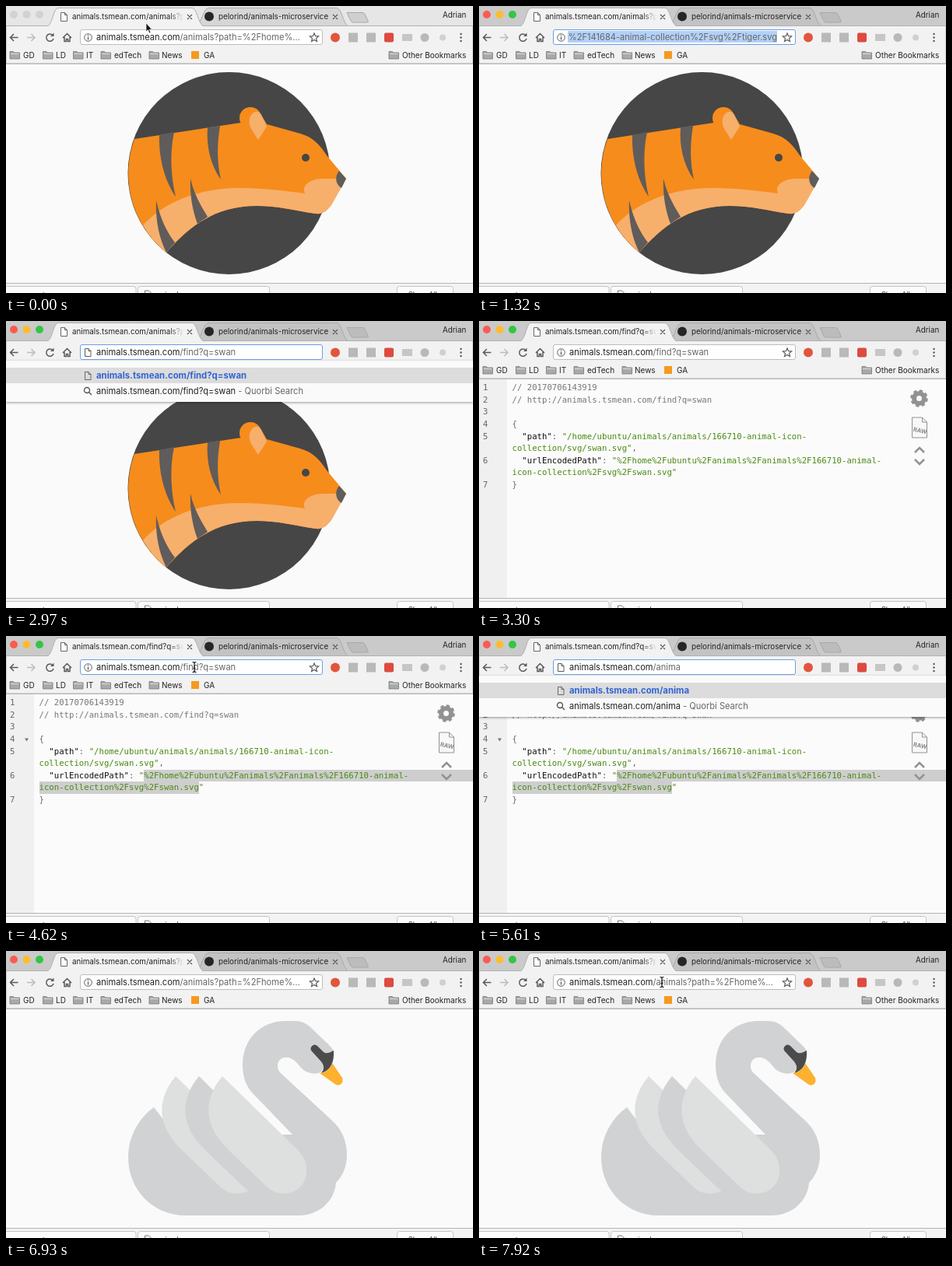
Animation, 600 px wide and 369 px high, one loop 8 s. Source, as an HTML page:

```html
<!DOCTYPE html>
<html lang="en">
<head>
<meta charset="utf-8">
<title>Animal lookup in a browser</title>
<style>
html, body { margin: 0; width: 100%; height: 100%; overflow: hidden; background: #fafafa; }
body { position: relative; font-family: Inter, Roboto, sans-serif; color: #222; }
svg { position: absolute; left: 0; top: 0; width: 600px; height: 369px; }
div, pre { position: absolute; margin: 0; white-space: pre; }
[hidden] { display: none !important; }
#json { left: 0; top: 0; width: 600px; height: 356px; background: #fbfbfb; }
pre { top: 78.2px; font: 10.67px/15.6px "DejaVu Sans Mono", monospace; color: #666; }
pre i { font-style: normal; color: #777; }
pre b { font-weight: 400; color: #111; }
pre s { text-decoration: none; color: #4b8a14; }
.gutter { left: 0; top: 74px; width: 36px; height: 282px; background: #f0f0f0; }
#marks { left: 0; top: 0; }
.mark { background: #cecece; height: 15.6px; }
#title { left: 85px; top: 6px; width: 143px; font-size: 9.8px; line-height: 15px; overflow: hidden;
  -webkit-mask: linear-gradient(90deg, #000 125px, transparent); mask: linear-gradient(90deg, #000 125px, transparent); }
#box { left: 95px; top: 30px; width: 312px; height: 20px; box-sizing: border-box; background: #fff;
  border: 1px solid #bdbdbd; border-radius: 3px; }
#box.focus { border: 1.5px solid #6a9ee6; }
#url { left: 116px; top: 32px; width: 267px; font-size: 11.1px; line-height: 16px; color: #666;
  overflow: hidden; text-overflow: ellipsis; }
#url.typing { width: 291px; text-overflow: clip; }
#url.end { left: 114px; width: 269px; display: flex; justify-content: flex-end; text-overflow: clip; }
#url b { font-weight: 400; color: #222; }
#url u { display: inline-block; text-decoration: none; background: #b3d1f8; height: 15px; line-height: 16px; }
#list { left: 0; top: 51px; width: 600px; padding: 8.5px 0 3.5px; background: #fafafa;
  box-shadow: 0 1px 3px #0006; }
.row { position: relative; height: 20.5px; line-height: 21px; font-size: 11.1px; }
.row:first-child { background: #dcdcdc; }
.row p { margin: 0 2px 0 116px; overflow: hidden; text-overflow: ellipsis; }
.row .page { color: #3264d2; font-size: 11.35px; }
.row .page b { font-weight: 700; }
.row i { font-style: normal; color: #666; }
.row svg { left: 99px; top: 4px; width: 12px; height: 13px; }
</style>
</head>
<body>
<svg id="tiger">
  <circle cx="286.5" cy="215" r="130" fill="#464646"/>
  <g fill="#f68c1c">
    <circle cx="314" cy="144" r="14"/>
    <path d="M165 171L302 150 320 132 328 140 335 152 378 164C396 169 404 180 412 192L437 222 419 254C413 264 406 268 398 267C370 263 350 257 322 257C270 257 236 282 206 317A130 130 0 0 1 165 171Z"/>
  </g>
  <g fill="#f7af6c">
    <path d="M176 282C205 250 250 234 300 234C335 234 360 238 384 241C379 230 392 222 408 222H437L419 254C413 264 406 268 398 267C370 263 350 257 322 257C270 257 236 282 206 317A130 130 0 0 1 176 282Z"/>
    <path d="M314 142C318 134 325 134 328 140L335 155 324 172 315 158C312 152 312 146 314 142Z"/>
  </g>
  <g fill="#5f5c5b">
    <path d="M428 212L437 222 431 234C423 229 422 219 428 212Z"/>
    <path d="M197 166L216 162C210 190 212 220 218 245C204 225 196 195 197 166Z"/>
    <path d="M259 156L275 154C271 178 271 200 276 223C263 205 257 180 259 156Z"/>
    <path d="M237 222C241 240 249 255 259 271L246 280C239 262 236 240 237 222Z"/>
    <path d="M193 250C198 272 206 290 217 304L206 317C195 295 192 270 193 250Z"/>
  </g>
  <circle cx="385" cy="195" r="5" fill="#464646"/>
</svg>

<svg id="swan">
  <defs><path id="feather" d="M278 161C265 176 258 195 261 213C264 232 275 245 288 258L334 302C342 310 350 312 358 312C376 311 388 297 386 278C385 268 380 261 375 256Z"/></defs>
  <path fill="#d0d2d3" d="M368 236L317 183C309 175 304 162 304 147C304 112 328 91 357 90H372C378 90 384 92 389 96L412 118C417 123 421 126 421 131L407 152C405 158 396 159 388 156C380 153 378 148 372 142C362 133 349 136 349 148C349 153 351 155 354 158L419 218C432 230 438 245 438 262C438 278 432 290 424 298C422 322 402 340 376 340H230C190 340 157 308 157 265C157 240 170 215 190 201L204 219 290 260 357 236Z"/>
  <use href="#feather" x="-60" fill="#dedfdf"/>
  <use href="#feather" x="-30" fill="#d0d2d3"/>
  <use href="#feather" fill="#dedfdf"/>
  <path fill="#4b4b4c" d="M392.500 128.500A5 5 0 0 1 400 122L408 130C412 133 417 130 421 128C422 143 417 154 405 157C409 152 410 147 403 140Z"/>
  <path fill="#fdb12f" d="M403 157C412 156 417 151 419 144L432 163C434 169 430 174 424 172Z"/>
</svg>

<div id="json">
  <div class="gutter"></div>
  <div id="marks"><div class="mark" style="left:177px;top:171.800px;width:423px"></div><div class="mark" style="left:43px;top:187.400px;width:205px"></div></div>
  <pre style="left:5px">1
2
3
4
5

6

7</pre>
  <pre style="left:42.500px"><i>// 20170706143919
// http://animals.tsmean.com/find?q=swan</i>

{
  <b>"path"</b>: <s>"/home/ubuntu/animals/animals/166710-animal-icon-
collection/svg/swan.svg"</s>,
  <b>"urlEncodedPath"</b>: <s>"%2Fhome%2Fubuntu%2Fanimals%2Fanimals%2F166710-animal-
icon-collection%2Fsvg%2Fswan.svg"</s>
}</pre>
  <svg fill="none" stroke="#929292">
    <path id="fold" d="M24 131.500h5l-2.500 4z" fill="#777" stroke="none"/>
    <circle cx="565.500" cy="99.500" r="6.500" stroke-width="6"/>
    <circle cx="565.500" cy="99.500" r="9.800" stroke-width="3" stroke-dasharray="4.200 3.497"/>
    <path d="M556.500 124h13l6 6v20h-19zM569.500 124v6h6" fill="#f8f8f8"/>
    <text x="558" y="143.500" font-size="7.500" font-weight="700" fill="#888" stroke="none" transform="rotate(12 566 140)">RAW</text>
    <path d="M560 169l6-6 6 6M560 178l6 6 6-6" stroke-width="2.500"/>
  </svg>
</div>

<svg id="chrome">
  <rect id="strip" width="600" height="26"/>
  <g id="lights"><circle cx="10" cy="11" r="5"/><circle cx="26.500" cy="11" r="5"/><circle cx="43" cy="11" r="5"/></g>
  <path id="backTab" d="M245 25.500C251 22 254 2.500 260 2.500H425C431 2.500 433 22 439 25.500" stroke="#a8a8a8"/>
  <path id="newTab" d="M438 8.500H458Q460 8.500 461 10.500L465 19Q466 21 464 21H446Q444 21 443 19Z" stroke="#a8a8a8"/>
  <path d="M0 25.500H54C60 22 61 2.500 67 2.500H239C245 2.500 247 22 253 25.500H600V74H0Z" fill="#f2f2f2" stroke="#b0b0b0"/>
  <path d="M0 74.500H600" stroke="#b8b8b8"/>
  <path d="M70.500 8.500h5l3 3v8h-8zM75.500 8.500v3h3" fill="#fff" stroke="#666"/>
  <circle cx="261" cy="13.500" r="6" fill="#262626"/>
  <g stroke="#555" stroke-width="1.100"><path d="M233 11l6 6m0-6l-6 6M420 11l6 6m0-6l-6 6"/></g>
  <g font-size="9.800" fill="#222">
    <text x="273" y="17">pelorind/animals-microservice</text>
    <text x="561" y="15">Adrian</text>
  </g>
  <g fill="none" stroke="#5a5a5a" stroke-width="1.500">
    <path d="M15.500 40.500H5.500m4.500-4.500l-4.500 4.500 4.500 4.500"/>
    <path d="M27 40.500h10m-4.500-4.500l4.500 4.500-4.500 4.500" stroke="#bcbcbc"/>
    <path d="M60 37.500A4.700 4.700 0 1 0 61 42"/><path d="M61.500 34.500v4.500h-4.500z" fill="#5a5a5a" stroke="none"/>
    <path d="M73 41l5.500-5.500L84 41M75 40v5.500h2.500v-3h2v3H82V40"/>
  </g>
  <circle cx="423" cy="40.500" r="6" fill="#e2553d"/>
  <g fill="#b9b9b9">
    <rect x="440" y="34.500" width="12" height="12"/><rect x="463" y="34.500" width="12" height="12"/>
    <rect x="509" y="36" width="13" height="9" fill="#c6c6c6"/><circle cx="538" cy="40.500" r="5.500"/>
    <circle cx="561" cy="40.500" r="4" fill="#d0d0d0"/>
  </g>
  <rect x="486" y="34.500" width="12" height="12" rx="2" fill="#dd4a40"/>
  <g fill="#555"><circle cx="584.500" cy="36" r="1.200"/><circle cx="584.500" cy="40.500" r="1.200"/><circle cx="584.500" cy="45" r="1.200"/></g>
  <g id="bookmarks" font-size="10" fill="#222"><rect x="238" y="58" width="10" height="10" fill="#f59a1f"/></g>
  <rect y="356" width="600" height="13" fill="#f3f3f3"/>
  <path d="M0 356.500H600" stroke="#b4b4b4"/>
  <g fill="#fbfbfb" stroke="#c4c4c4"><rect x="-4" y="360.500" width="171" height="24" rx="3"/><rect x="169.500" y="360.500" width="169" height="24" rx="3"/><rect x="502.500" y="360.500" width="72" height="24" rx="3"/></g>
  <g font-size="9" fill="#444"><text x="24" y="374">report.svg</text><text x="194" y="374">animals.svg</text><text x="517" y="374">Show All</text></g>
  <path d="M178.500 370v-4h5l3 3v3" fill="none" stroke="#777"/>
</svg>
<div id="title"></div>
<div id="list"></div>
<div id="box"></div>
<svg fill="none" stroke="#5a5a5a">
  <g id="info"><circle cx="105.500" cy="40.500" r="4.800"/><path d="M105.500 39.500v4M105.500 37v1.300" stroke-width="1.300"/></g>
  <path id="doc" d="M101.500 35.500h4.500l3 3v7h-7.500zM106 35.500v3h3"/>
  <path id="star" stroke-width="1.200" d="M396 35l1.600 3.700 4 .3-3.100 2.600 1 3.900-3.500-2.100-3.500 2.100 1-3.900-3.100-2.600 4-.3z"/>
</svg>
<div id="url"></div>
<svg>
  <path id="arrow" d="M0 0V11L2.500 8.700 4.200 13 6 12.200 4.200 8.200H7.500Z" fill="#111" stroke="#fff" stroke-width=".7"/>
  <path id="beam" d="M-2.500-6.500Q0-6.500 0-5Q0-6.500 2.500-6.500M0-5V5M-2.500 6.500Q0 6.500 0 5Q0 6.500 2.500 6.500M-1.500 1.500h3" fill="none" stroke="#111" stroke-width="1.200"/>
</svg>

<script>
const $ = id => document.getElementById(id);
const STEP = 330, LOOP = 8000;
const HOST = 'animals.tsmean.com';
const HOME = '/animals?path=%2Fhome%2Fubuntu%2Fanimals%2Fanimals%2F';
const TIGER = HOME + '141684-animal-collection%2Fsvg%2Ftiger.svg';
const SWAN = HOME + '166710-animal-icon-collection%2Fsvg%2Fswan.svg';

const folder = x => `<path d="M${x} 58.500h4.500l1.500 1.500h6.500v8h-12.500z" fill="#a9a9a9" stroke="#777" stroke-width=".8"/><path d="M${x + 1} 61.500h10.500" stroke="#ddd"/>`;
const label = (x, name) => `<text x="${x}" y="66.700">${name}</text>`;
$('bookmarks').innerHTML += [[5, 22, 'GD'], [47.5, 64, 'LD'], [86.5, 103, 'IT'], [122, 139, 'edTech'], [184, 200, 'News'], [492, 509, 'Other Bookmarks']]
  .map(([x, tx, name]) => folder(x) + label(tx, name)).join('') + label(254, 'GA');

const pageIcon = '<svg fill="none" stroke="#666"><path d="M2.500 1.500h4.500l3 3v7h-7.500zM7 1.500v3h3"/></svg>';
const lensIcon = '<svg fill="none" stroke="#555" stroke-width="1.400"><path d="M7.500 7.500L11 11"/><circle cx="5" cy="5" r="3.500"/></svg>';
const pageRow = (typed, rest = '') => `<div class="row">${pageIcon}<p class="page"><b>${HOST + typed}</b>${rest}</p></div>`;
const searchRow = typed => `<div class="row">${lensIcon}<p>${HOST + typed}<i> - Quorbi Search</i></p></div>`;

// Typing in the address field: typed text, selected completion, extra suggestions.
const typing = (typed, rest = '', more = '') => ({
  path: typed, selected: rest, mode: 'typing', focus: true, cursor: null,
  rows: pageRow(typed, rest) + searchRow(typed) + more
});
const loaded = (page, path) => ({ page, path, title: path, selected: '', mode: '', focus: false, rows: '', cursor: null });
const pointer = (kind, x, y) => ({ cursor: { kind, x, y } });

// Changes applied one after another, keyed by step.
const changes = {
  0: { ...loaded('tiger', TIGER), active: false, ...pointer('arrow', 180, 22) },
  1: { active: true, ...pointer('beam', 182, 40) },
  2: { mode: 'all', focus: true },
  3: { mode: 'end', ...pointer('beam', 388, 41) },
  4: { cursor: null },
  5: typing('/', 'find?q=tiger', pageRow('/', 'find?q=swan') + pageRow('/', TIGER.slice(1)) + pageRow('/', 'animals')),
  6: typing('/find', '?q=tiger'),
  7: typing('/find?q=', 'tiger'),
  8: typing('/find?q=s', 'wan'),
  9: typing('/find?q=swan'),
  10: loaded('json', '/find?q=swan'),
  11: { fold: true, ...pointer('beam', 177, 177) },
  12: { marks: true, ...pointer('beam', 249, 196) },
  13: pointer('beam', 256, 222),
  14: { focus: true, ...pointer('beam', 242, 40) },
  15: typing('/', 'find?q=swan'),
  16: typing('/an'),
  17: typing('/anima'),
  18: typing('/animals?'),
  19: typing('/animals?path='),
  20: typing(SWAN),
  21: loaded('swan', SWAN),
  24: pointer('beam', 235, 40)
};

const fieldHtml = s => {
  const host = `<b>${HOST}</b>`;
  if (s.mode === 'end' || s.mode === 'all') return `<u>${host}${s.path}</u>`;
  return host + s.path + (s.selected && `<u>${s.selected}</u>`);
};

function show(s) {
  const visible = (id, on) => $(id).style.display = on ? '' : 'none';
  for (const page of ['tiger', 'swan', 'json']) visible(page, s.page === page);
  visible('marks', s.marks);
  visible('fold', s.fold);
  visible('list', s.rows);
  visible('info', s.mode !== 'typing');
  visible('star', s.mode !== 'typing');
  visible('doc', s.mode === 'typing');
  $('list').innerHTML = s.rows;
  $('title').textContent = HOST + s.title;
  $('box').className = s.focus ? 'focus' : '';
  $('url').className = s.mode;
  $('url').innerHTML = fieldHtml(s);
  $('strip').setAttribute('fill', s.active ? '#cacaca' : '#e6e6e6');
  $('backTab').setAttribute('fill', s.active ? '#c3c3c3' : '#d6d6d6');
  $('newTab').setAttribute('fill', s.active ? '#bcbcbc' : '#cfcfcf');
  ['#fb5a52', '#fdbc31', '#33c546'].forEach((color, i) =>
    $('lights').children[i].setAttribute('fill', s.active ? color : '#d2d2d2'));
  for (const kind of ['arrow', 'beam']) {
    const on = s.cursor && s.cursor.kind === kind;
    visible(kind, on);
    if (on) $(kind).setAttribute('transform', `translate(${s.cursor.x} ${s.cursor.y})`);
  }
}

let current = -1;
function tick() {
  const step = Math.floor(performance.now() % LOOP / STEP);
  if (step !== current) {
    const state = {};
    for (let i = 0; i <= step; i++) Object.assign(state, changes[i]);
    show(state);
    current = step;
  }
  requestAnimationFrame(tick);
}
tick();
</script>
</body>
</html>
```
